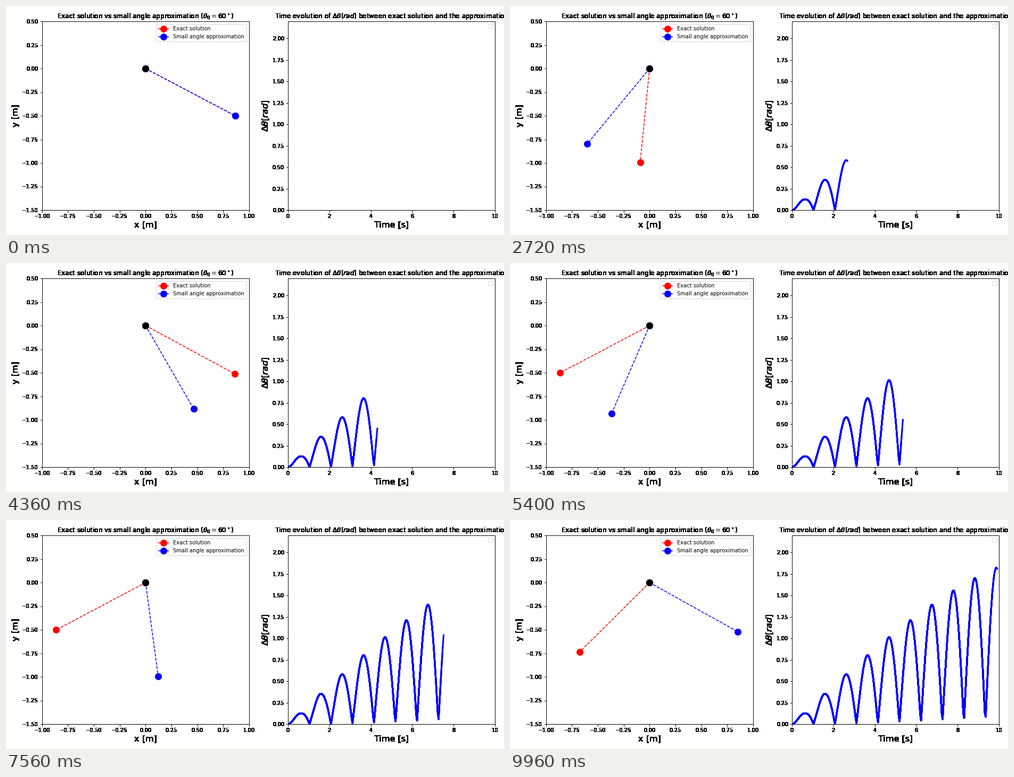
A matplotlib script for the animation above (10000 ms loop, 936 by 432 pixels).

```python
import numpy as np
import matplotlib.pyplot as plt
from matplotlib.animation import FuncAnimation

W, H = 936, 432
DT, FRAMES = 0.04, 250
THETA0, OMEGA2 = np.pi / 3, 9.81
COPIES = 50  # overlaid traces: older parts of the curve get harder edges

plt.rcParams.update({"font.family": "DejaVu Sans", "font.size": 10})


def swing(state):
    theta, speed = state
    return np.array([speed, -OMEGA2 * np.sin(theta)])


def exact_angles():
    """Integrate the full pendulum equation with Runge-Kutta steps."""
    state = np.array([THETA0, 0.0])
    angles = []
    for _ in range(FRAMES):
        angles.append(state[0])
        k1 = swing(state)
        k2 = swing(state + DT / 2 * k1)
        k3 = swing(state + DT / 2 * k2)
        k4 = swing(state + DT * k3)
        state = state + DT / 6 * (k1 + 2 * k2 + 2 * k3 + k4)
    return np.array(angles)


def add_panel(left, xlim, ylim, title, xlabel, ylabel):
    ax = fig.add_axes([left / W, 1 - 385 / H, 389 / W, 356 / H])
    ax.set(xlim=xlim, ylim=ylim)
    ax.set_title(title, fontsize=12)
    ax.set_xlabel(xlabel, fontsize=16)
    ax.set_ylabel(ylabel, fontsize=16)
    return ax


def freeze(axes):
    """Render the static parts once, dropping alpha so outer text is solid."""
    fig.canvas.draw()
    backdrop = np.array(fig.canvas.buffer_rgba())[..., :3].copy()
    fig.set_facecolor("white")
    fig.figimage(backdrop, zorder=-1)
    for ax in axes:
        ax.set_title("")
        ax.xaxis.set_visible(False)
        ax.yaxis.set_visible(False)
        ax.patch.set_visible(False)
        ax.get_legend().set_visible(False)


time = np.arange(FRAMES) * DT
theta = exact_angles()
theta_small = THETA0 * np.cos(np.sqrt(OMEGA2) * time)
gap = np.abs(theta - theta_small)

fig = plt.figure(figsize=(W / 72, H / 72), dpi=72, facecolor=(1, 1, 1, 0))
ax_swing = add_panel(
    67.8, (-1, 1), (-1.5, 0.5),
    r"Exact solution vs small angle approximation ($\theta_0 = 60^\circ$)",
    "x [m]", "y [m]")
ax_gap = add_panel(
    529.9, (0, 10), (0, 2.2),
    r"Time evolution of $\Delta\theta [rad]$ between exact solution"
    " and the approximation",
    "Time [s]", r"$\Delta\theta [rad]$")

exact_rod, = ax_swing.plot([], [], "o--", color="red", ms=12,
                           label="Exact solution")
small_rod, = ax_swing.plot([], [], "o--", color="blue", ms=12,
                           label="Small angle approximation")
ax_swing.legend(loc="upper right")
ax_gap.legend(handles=[], loc="upper right")

freeze([ax_swing, ax_gap])
ax_swing.plot([0], [0], "o", color="black", ms=12)
traces = [ax_gap.plot([], [], color="blue", lw=3)[0] for _ in range(COPIES)]


def update(i):
    for rod, angle in ((exact_rod, theta[i]), (small_rod, theta_small[i])):
        rod.set_data([0, np.sin(angle)], [0, -np.cos(angle)])
    for lag, trace in enumerate(traces):
        n = max(i - lag, 0)
        trace.set_data(time[:n], gap[:n])
    return [exact_rod, small_rod, *traces]


anim = FuncAnimation(fig, update, frames=FRAMES, interval=40, repeat=True)
plt.show()
```
